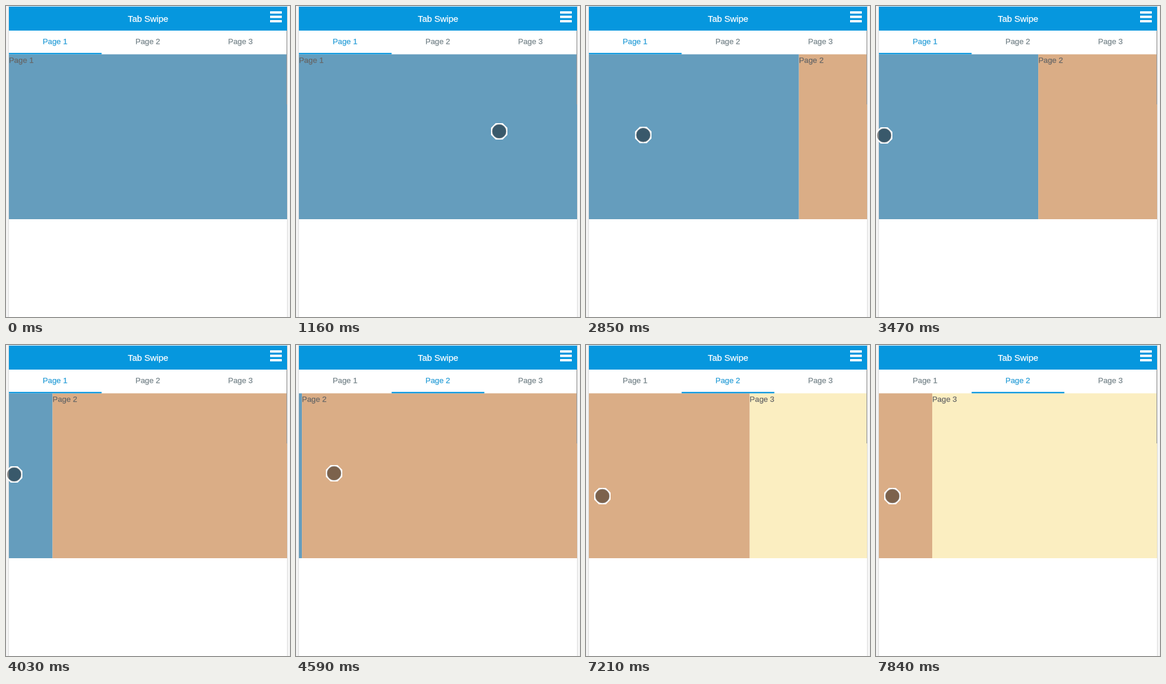
Write an HTML page that moves like this. It is 485 px wide and 531 px high and loops after 7990 ms.

```html
<!DOCTYPE html>
<html lang="en">
<head>
<meta charset="utf-8">
<title>Tab Swipe</title>
<style>
  html, body { margin: 0; width: 100%; height: 100%; overflow: hidden; background: #fff; }
  svg { display: block; width: 485px; height: 531px; }
  text { font: 13.3px "Liberation Sans", Arial, sans-serif; stroke-width: .25; }
  .tab { fill: #76848a; stroke: #76848a; text-anchor: middle; }
  .tab.on { fill: #2b9fd8; stroke: #2b9fd8; }
  .label { fill: #666; stroke: #666; }
  .title { font-size: 15px; fill: #fff; stroke: #fff; text-anchor: middle; }
</style>
</head>
<body>
<svg viewBox="0 0 485 531">
  <clipPath id="view"><rect x="5" y="82" width="475" height="282"/></clipPath>
  <rect width="4" height="531" fill="#f3f3f3"/>
  <rect x="4" width="1" height="531" fill="#dcdcdc"/>
  <rect x="482" width="3" height="531" fill="#f3f3f3"/>
  <rect x="480" width="1" height="531" fill="#d4d4d4"/>
  <rect x="5" y="1" width="475" height="41" fill="#0697de"/>
  <text class="title" x="242.5" y="26.5">Tab Swipe</text>
  <path d="M451 11h20m-20 7.5h20m-20 7.5h20" stroke="#fff" stroke-width="4"/>
  <g id="tabs"></g>
  <g clip-path="url(#view)"><g id="pages"></g></g>
  <rect x="479" y="42" width="1" height="126" fill="#999"/>
  <rect id="bar" y="80" width="158.3" height="2.5" fill="#149bdf"/>
  <g id="touch">
    <path fill="#fff" fill-rule="evenodd"
      d="M-6-14H6L14-6V6L6 14H-6L-14 6V-6ZM-12 0a12 12 0 1 0 24 0a12 12 0 1 0-24 0Z"/>
    <circle r="11.8" fill="#000" fill-opacity=".43" stroke="#8a8a8a" stroke-opacity=".8"/>
  </g>
</svg>
<script>
const LOOP = 7990, WIDTH = 475, TAB = WIDTH / 3, SHOWN = 140, SWITCH = 4200;
const $ = id => document.getElementById(id);
const ramp = (t, from, to) => Math.min(1, Math.max(0, (t - from) / (to - from)));
const easeOut = (p, power) => 1 - (1 - p) ** power;

// The page trails the finger, then catches up once the finger rests.
const swipe = (t, from, rest, drag) =>
  drag * ramp(t, from, rest) ** 1.3 + (384 - drag) * easeOut(ramp(t, rest, rest + 630), 3);

const scrollAt = t => swipe(t, 1680, 3470, 202)
  + (WIDTH - 384) * easeOut(ramp(t, 3950, 4790), 2)
  + swipe(t, 6120, 7210, 199.5);

// Finger moves: start time, end time, x, y
const moves = [
  [140, 830, 353, 210], [980, 1160, 347, 214], [1390, 2150, 245, 219],
  [2150, 3250, 14, 221], [4100, 4590, 65, 219], [4590, 4910, 75, 212],
  [5130, 5820, 428, 237], [6050, 6120, 407, 239], [6120, 7050, 28, 258]
];
const touchAt = t => moves.reduce(([x, y], [from, to, toX, toY]) => {
  const p = ramp(t, from, to);
  return [x + (toX - x) * p, y + (toY - y) * p];
}, [269, 491]);

["#659dbd", "#daad86", "#fbeec1"].forEach((color, i) => {
  const name = "Page " + (i + 1), x = 5 + i * WIDTH;
  $("tabs").innerHTML += `<text class="tab" x="${4.6 + TAB * (i + .5)}" y="64.5">${name}</text>`;
  $("pages").innerHTML += `<rect x="${x}" y="82.5" width="${WIDTH}" height="281.5" fill="${color}"/>
    <text class="label" x="${x}" y="96.5">${name}</text>`;
});
const tabs = [...$("tabs").children];

function draw(t) {
  const active = t < SWITCH ? 0 : 1;
  $("pages").setAttribute("transform", `translate(${-scrollAt(t)})`);
  $("touch").setAttribute("transform", `translate(${touchAt(t)})`);
  $("touch").style.display = t < SHOWN ? "none" : "";
  $("bar").setAttribute("x", 5 + active * TAB);
  tabs.forEach((tab, i) => tab.classList.toggle("on", i === active));
}

const start = performance.now();
function tick() {
  draw((performance.now() - start) % LOOP);
  requestAnimationFrame(tick);
}
tick();
</script>
</body>
</html>
```
